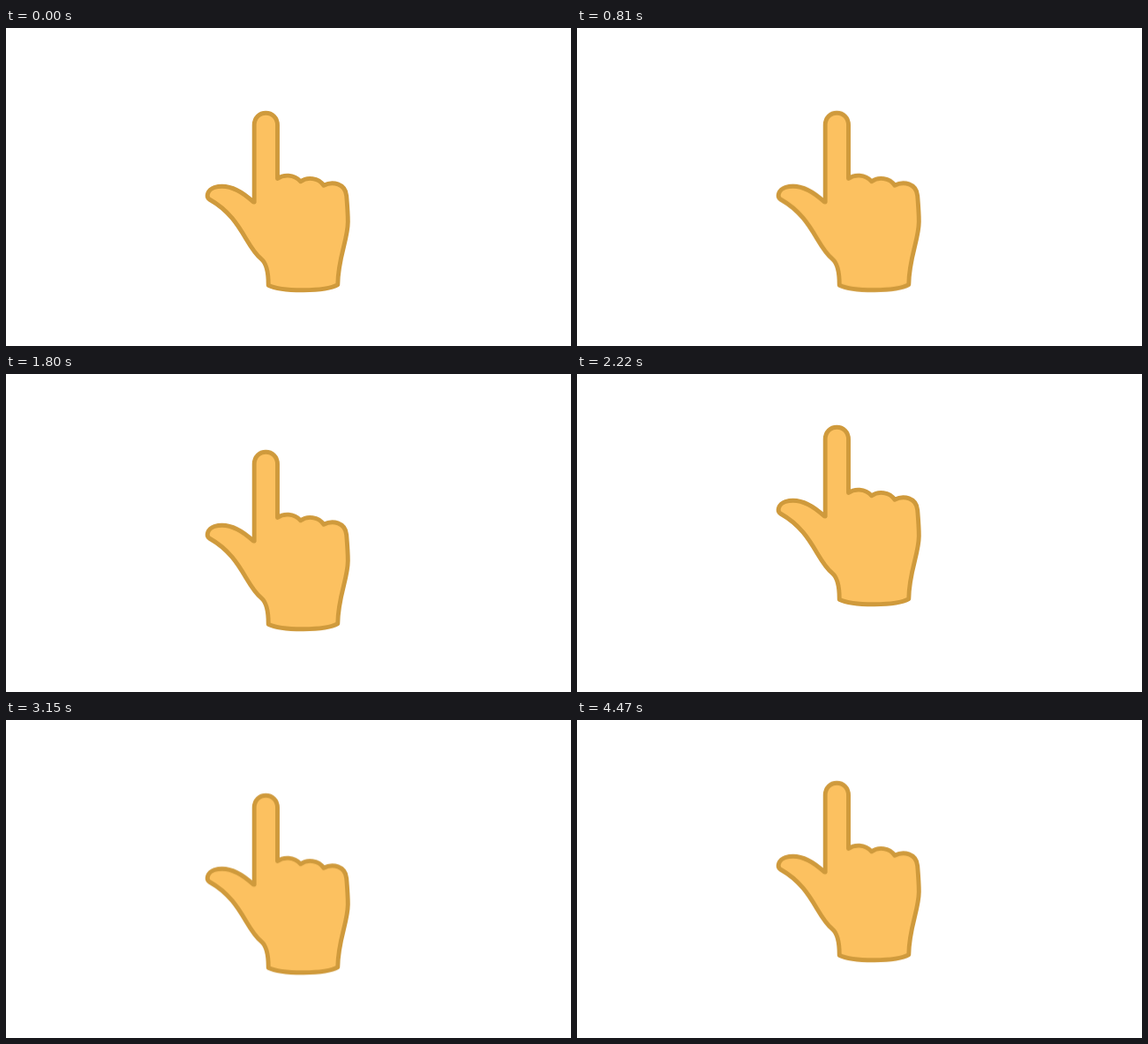
Animation of 640x360 px, one loop 4.5 s. Source, as an HTML page:

```html
<!DOCTYPE html>
<html lang="en">
<head>
<meta charset="utf-8">
<title>Pointing hand</title>
<style>
  html, body { margin: 0; width: 100%; height: 100%; overflow: hidden; background: #fff; }
  svg { display: block; width: 100vw; height: 100vh; }
  #hand { fill: #fcc160; stroke: #cf9a3c; stroke-width: 4.9; stroke-linejoin: round; }
</style>
</head>
<body>
<svg viewBox="0 0 640 360">
  <path id="hand" d="M281.200 197
    V110 C281.200 101.500 287 96.300 294.300 96.300 S307.500 101.500 307.500 110
    V170.500 C314 165.700 326 165.300 333.800 173.800
    C341 168.300 354 169.300 359.800 178.200
    C370 173 384.500 176 385.700 190
    C386.500 200 387.300 209 387.300 219
    C387.600 239 376 260 375.800 290.600
    C362 298.600 312 298.600 297.200 291.200
    C297.300 278 295.800 267 289.300 261.600
    C271 247 267 214.500 230.400 194
    C226.200 191 228.200 183.300 236 180.500
    C250 176.200 266 183.700 280 196.800 Z"/>
</svg>
<script>
  const LOOP = 4500, STEP = 30, BOB = LOOP / 5.25;
  const hand = document.getElementById('hand');

  const pose = (offset, lift, easing = 'linear') =>
    ({ offset, easing, transform: `translateY(${-lift}px)` });

  // Eased rise, short hold, quick drop that settles slowly.
  const bob = hand.animate([
    pose(0, 0),
    pose(0.02, 0, 'ease'),
    pose(0.5, 36),
    pose(0.605, 36, 'cubic-bezier(.4, 0, .7, .85)'),
    pose(0.685, 8, 'cubic-bezier(.2, .5, .4, 1)'),
    pose(1, 0)
  ], { duration: BOB, iterations: Infinity });
  bob.pause();

  const start = performance.now();
  function draw() {
    const t = (performance.now() - start) % LOOP;
    bob.currentTime = Math.floor(t / STEP) * STEP;
    requestAnimationFrame(draw);
  }
  draw();
</script>
</body>
</html>
```
